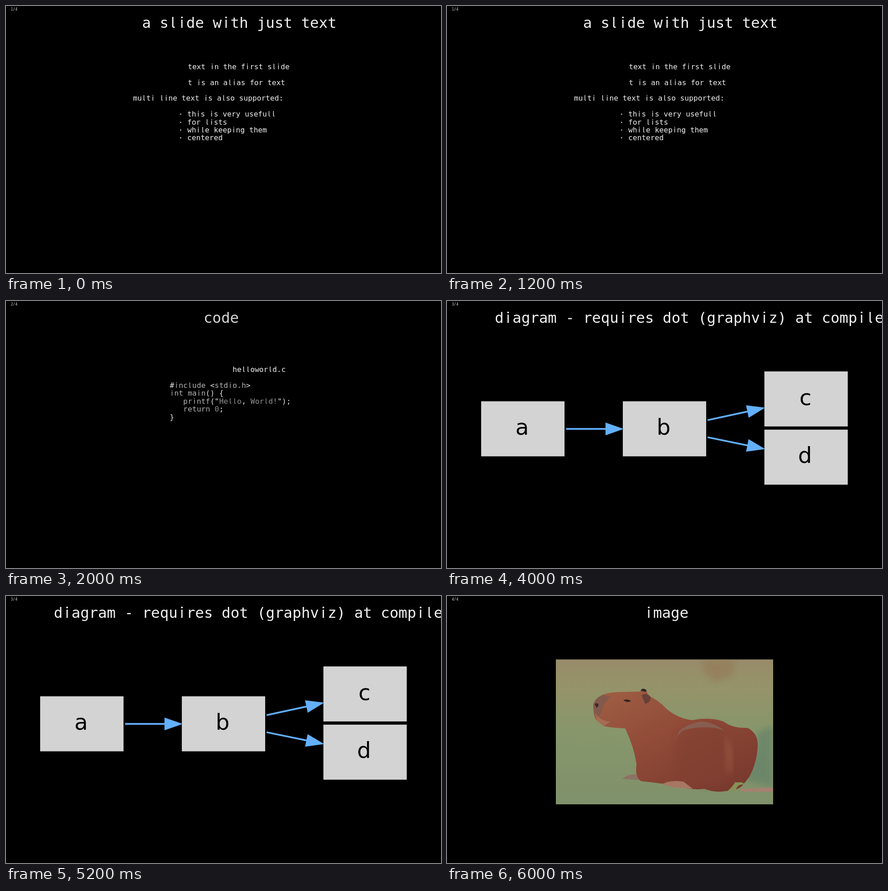
Recreate the animation shown at these times as an HTML page. Size 955 by 587 pixels, loop 8 s.

```html
<!DOCTYPE html>
<html lang="en">
<head>
<meta charset="utf-8">
<title>Slides</title>
<style>
  html, body { margin: 0; width: 100%; height: 100%; overflow: hidden; background: #000; }
  svg { display: block; width: 100vw; height: 100vh; }
  .mono { font-family: "DejaVu Sans Mono", monospace; text-anchor: middle; white-space: pre; }
  .mono .thin { font-family: Inter, "DejaVu Sans", sans-serif; font-feature-settings: "cv05"; }
  .node { font: 48px "DejaVu Sans", sans-serif; text-anchor: middle; }
</style>
</head>
<body>
<svg id="stage" viewBox="0 0 955 587">
  <defs>
    <linearGradient id="grass" x2="0" y2="1">
      <stop offset="0" stop-color="#988c69"/>
      <stop offset=".2" stop-color="#959369"/>
      <stop offset=".5" stop-color="#87966b"/>
      <stop offset="1" stop-color="#7f916b"/>
    </linearGradient>
    <linearGradient id="fur" x2=".9" y2="1">
      <stop offset="0" stop-color="#a06045"/>
      <stop offset=".45" stop-color="#914b38"/>
      <stop offset="1" stop-color="#77382d"/>
    </linearGradient>
    <filter id="soft"><feGaussianBlur stdDeviation="7"/></filter>
    <clipPath id="frame"><rect x="239" y="139.5" width="477" height="318.5"/></clipPath>
  </defs>
</svg>
<script>
const NS = "http://www.w3.org/2000/svg";
const stage = document.getElementById("stage");
const SLIDE_MS = 2000;
const WHITE = "#f0f0f0";

function add(parent, tag, attrs, text) {
  const el = document.createElementNS(NS, tag);
  for (const key in attrs) el.setAttribute(key, attrs[key]);
  if (text !== undefined) el.textContent = text;
  parent.append(el);
  return el;
}

// Sets [text, colour] parts on a fixed character grid.
function line(parent, x, y, parts, size, pitch) {
  const el = add(parent, "text", { class: "mono", y, "font-size": size });
  let column = 0;
  for (const [text, fill] of parts) {
    for (const ch of text) {
      const attrs = { x: (x + (column++ + 0.5) * pitch).toFixed(2), fill };
      if (ch === "i" || ch === "l") attrs.class = "thin";
      add(el, "tspan", attrs, ch);
    }
  }
}

const body = (g, x, y, text) => line(g, x, y, [[text, WHITE]], 16.2, 9.71);
const code = (g, y, ...parts) => line(g, 359.5, y, parts, 16.2, 9.85);

function slide(number, title, x, fill = WHITE) {
  const g = add(stage, "g", { visibility: "hidden" });
  line(g, 10.4, 9.8, [[number + "/4", "#cfcfcf"]], 8, 4.9);
  line(g, x, 48.2, [[title, fill]], 32.4, 19.4);
  return g;
}

function textSlide() {
  const g = slide(1, "a slide with just text", 298.8);
  body(g, 399.2, 138.7, "text in the first slide");
  body(g, 399.2, 173.6, "t is an alias for text");
  body(g, 278.8, 208.4, "multi line text is also supported:");
  ["this is very usefull", "for lists", "while keeping them", "centered"]
    .forEach((item, i) => body(g, 378.6, 243.2 + i * 17.4, "· " + item));
  return g;
}

function codeSlide() {
  const g = slide(2, "code", 433.7, "#d6d6d6");
  const light = "#e6e6e6", mid = "#b4b4b4", dim = "#919191";
  body(g, 497.6, 156.2, "helloworld.c");
  code(g, 191.1, ["#", light], ["include ", mid], ["<", light], ["stdio.h", mid], [">", light]);
  code(g, 208.4, ["int ", mid], ["main", mid], ["() {", light]);
  code(g, 225.8, ["   printf", mid], ["(", light], ['"', light], ["Hello", dim], [", ", light],
    ["World!", dim], ['");', light]);
  code(g, 243.2, ["   return ", mid], ["0", dim], [";", light]);
  code(g, 260.6, ["}", light]);
  return g;
}

function diagramSlide() {
  const g = slide(3, "diagram - requires dot (graphviz) at compile time", 105);
  const node = (name, x, y, tx, ty) => {
    add(g, "rect", { x, y, width: 183, height: 121, fill: "#d3d3d3" });
    add(g, "text", { class: "node", x: tx, y: ty, fill: "#000" }, name);
  };
  const arrow = (x1, y1, x2, y2) => {
    const angle = Math.atan2(y2 - y1, x2 - x1) * 180 / Math.PI;
    const length = Math.hypot(x2 - x1, y2 - y1);
    const a = add(g, "g", { transform: `translate(${x1} ${y1}) rotate(${angle})`, fill: "#63b0ff" });
    add(a, "rect", { y: -1.9, width: length - 39, height: 3.8 });
    add(a, "path", { d: `M${length} 0l-40 -14v28z` });
  };
  node("a", 75, 220.5, 165, 294);
  node("b", 386, 220.5, 475.5, 294);
  node("c", 696.8, 154.8, 787, 229);
  node("d", 696.8, 282.8, 786, 356);
  arrow(261.5, 281.2, 388, 281.2);
  arrow(572, 262, 698.5, 234.5);
  arrow(572, 299.5, 698.5, 325.5);
  return g;
}

function imageSlide() {
  const g = slide(4, "image", 433.2);
  const photo = add(g, "g", { "clip-path": "url(#frame)" });
  const shape = (d, fill, extra) => add(photo, "path", { d, fill, ...extra });
  const blur = { filter: "url(#soft)", opacity: 0.5 };
  add(photo, "rect", { x: 239, y: 139, width: 477, height: 320, fill: "url(#grass)" });
  shape("M560 139H632L626 174 590 190 565 170Z", "#93694c", { ...blur, opacity: 0.35 });
  shape("M640 400Q684 350 680 300L716 285V420Z", "#587a68", blur);
  shape("M640 424L716 421V431L650 430Z", "#a48170");
  shape("M385 402Q400 388 424 393V405Z", "#8c7264");
  // Animal: outline, then shading, face and feet.
  shape("M321 240Q324 226 342 217Q361 210 386 211L424 210Q428 202 438 207" +
    "L442 219Q463 228 483 249Q507 269 538 273Q576 265 607 276Q627 291 660 290" +
    "Q684 302 682 332Q680 367 664 397L650 415Q640 428 610 429Q590 433 565 424" +
    "Q532 428 502 416L426 407Q412 397 416 370Q411 333 391 291Q363 290 344 286" +
    "L329 274Q321 266 321 240Z", "url(#fur)");
  shape("M508 302Q535 278 590 278Q622 288 629 330L626 395Q610 419 565 419Q510 400 498 350Z",
    "#803f31", blur);
  shape("M500 327Q506 303 519 295Q548 287 580 289Q600 291 611 298" +
    "Q588 278 559 276Q528 280 509 298Z", "#86685f", { opacity: 0.7 });
  shape("M609 305Q631 325 626 380L617 395Z", "#a26349", blur);
  shape("M321 239Q326 222 344 217L359 222Q342 236 341 253Q334 268 324 266Z", "#83594b");
  shape("M324 257Q340 277 359 276L344 286 329 274Z", "#a46c55");
  shape("M324 237Q332 233 333 241L328 246Z", "#3b2928");
  shape("M387 229Q396 225 404 231Q396 236 387 229Z", "#302522");
  shape("M425 208Q429 200 438 207L436 211Z", "#252c2e");
  shape("M427 218Q439 211 447 222Q447 235 435 237Z", "#684037");
  shape("M472 414Q490 404 519 408L540 424 500 421Z", "#a77764");
  shape("M614 430Q625 422 633 409L636 410Q651 408 653 415Q638 412 634 427Z", "#879257");
  return g;
}

const slides = [textSlide(), codeSlide(), diagramSlide(), imageSlide()];

function draw(ms) {
  const active = Math.floor(ms / SLIDE_MS) % slides.length;
  slides.forEach((g, i) => g.setAttribute("visibility", i === active ? "visible" : "hidden"));
}

const start = performance.now();
function tick() {
  draw(performance.now() - start);
  requestAnimationFrame(tick);
}
tick();
</script>
</body>
</html>
```
